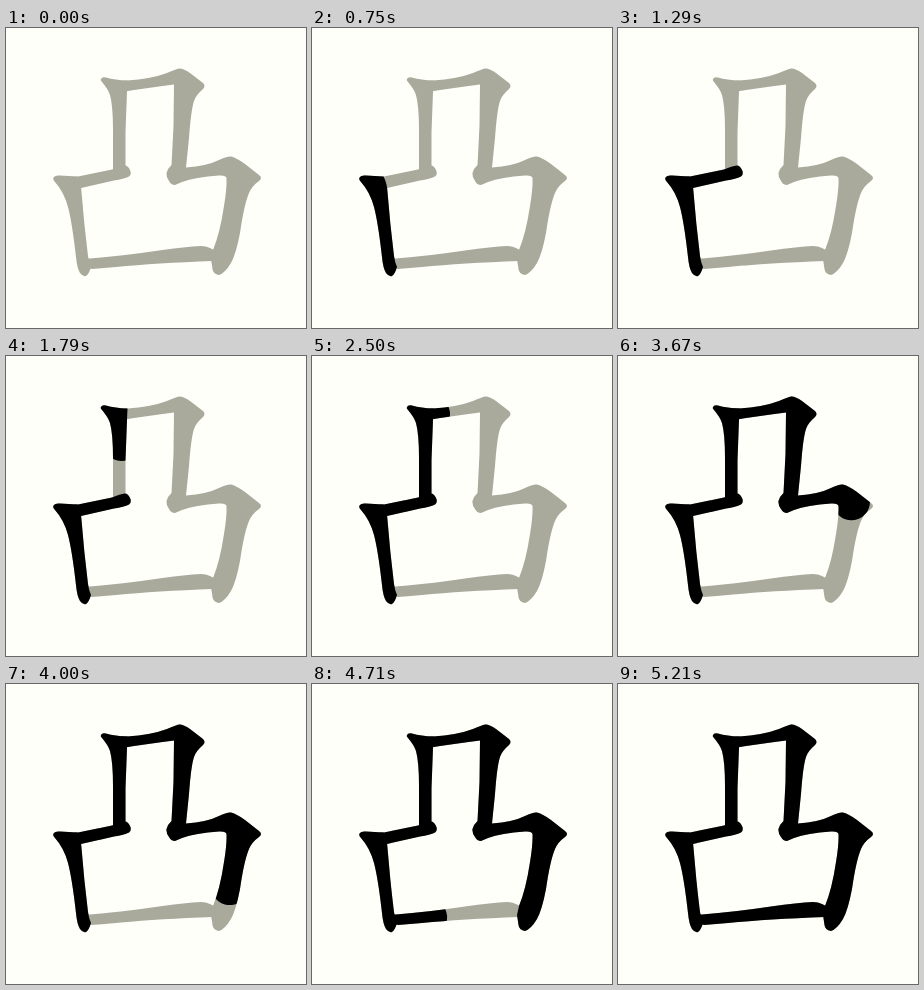
An HTML page that plays this animation: 300x300 px, repeating every 5.29 s.

```html
<!DOCTYPE html>
<html lang="zh">
<head>
<meta charset="utf-8">
<title>Stroke order</title>
<style>
  html, body { margin: 0; width: 100%; height: 100%; overflow: hidden; background: #fffffa; }
  svg { display: block; width: 100%; height: 100%; }
  .base { fill: #a9a99c; }
  .ink { fill: none; stroke: #000; stroke-width: 37; stroke-linejoin: round; stroke-linecap: round; }
</style>
</head>
<body>
<svg id="stage" viewBox="0 0 300 300"></svg>
<script>
const LOOP = 5290;

// shape: outline; spine: path of the round brush inside it
const strokes = [
  {
    shape: 'M48 149Q49 147 54 147.5L71.5 148.5Q75 155 75.5 164Q78 196 82 228Q83 235 85 239' +
           'Q83 246 80 248Q77 249 74 245Q71 240 70 229Q66 194 62 179Q58 164 49 154Q46 151 48 149Z',
    spine: 'M50 151L63 164L79 247', start: 40, end: 610
  },
  {
    shape: 'M67 149L72 148.5L106 141.5Q114 138 119 137.5Q122 137.5 124 142Q126 146 123 148.5' +
           'Q118 151 108 152.5L75 160L70 159Z',
    spine: 'M62 156L124 143', start: 920, end: 1260
  },
  {
    shape: 'M95 51Q96 48.5 100 49.5Q109 52 121.5 52.5L121 64L119.5 104L119.5 142L107 143' +
           'L107 102Q107 78 104 67Q102 61 96 54Q94 52 95 51Z',
    spine: 'M98 50L113 60L116 86V131', start: 1540, end: 2040
  },
  {
    shape: 'M116 53L121 52.5Q145 51 161 45Q170 41 173 40.5Q177 40 184 45L197 55Q200 58 197 61' +
           'Q190 67 188 73Q185 82 183 110L180 139.5Q201 138 213 132Q221 128 225 128.5' +
           'Q231 130 239 136L253 147Q257 150 253 153Q246 158 243 165Q238 177 234 205' +
           'Q230 226 225 235Q219 245 213 247Q207 246 206.5 241L205 231L207 222Q214 205 218 178' +
           'Q221 160 220.5 150Q220 147 213 147.5Q189 149 176 154L169 157Q165 157 163 153' +
           'Q160 149 160.5 145Q162 140 165.5 137L167.5 98L168 56.5Q146 59 116 64Z',
    spine: 'M90 60L119.5 58L170 51L181 58L178 124L175 147L226 139L238 150L222.6 206.6L215 240',
    start: 2340, end: 4210
  },
  {
    shape: 'M80 230.5L84 230.5Q116 228 153 222.5Q180 218.5 195 218Q200 218 204 220L210 223L207 233' +
           'Q150 235 110 239L86 241L80 239Z',
    spine: 'M78 236L208 227', start: 4500, end: 5210
  }
];

const stage = document.getElementById('stage');

function add(parent, tag, attrs) {
  const node = document.createElementNS('http://www.w3.org/2000/svg', tag);
  for (const name in attrs) node.setAttribute(name, attrs[name]);
  return parent.appendChild(node);
}

for (const s of strokes) add(stage, 'path', { d: s.shape, class: 'base' });

strokes.forEach((s, i) => {
  const clip = add(stage, 'clipPath', { id: 'clip' + i });
  add(clip, 'path', { d: s.shape });
  const group = add(stage, 'g', { 'clip-path': `url(#clip${i})` });
  s.brush = add(group, 'path', { d: s.spine, class: 'ink' });
  s.full = add(stage, 'path', { d: s.shape });
  s.length = s.brush.getTotalLength();
});

function draw(time) {
  for (const s of strokes) {
    const p = (time - s.start) / (s.end - s.start);
    const active = p > 0 && p < 1;
    s.brush.style.display = active ? '' : 'none';
    s.full.style.display = p >= 1 ? '' : 'none';
    if (active) s.brush.setAttribute('stroke-dasharray', `${s.length * p} 999`);
  }
}

const origin = performance.now();
function tick() {
  draw((performance.now() - origin) % LOOP);
  requestAnimationFrame(tick);
}
tick();
</script>
</body>
</html>
```
